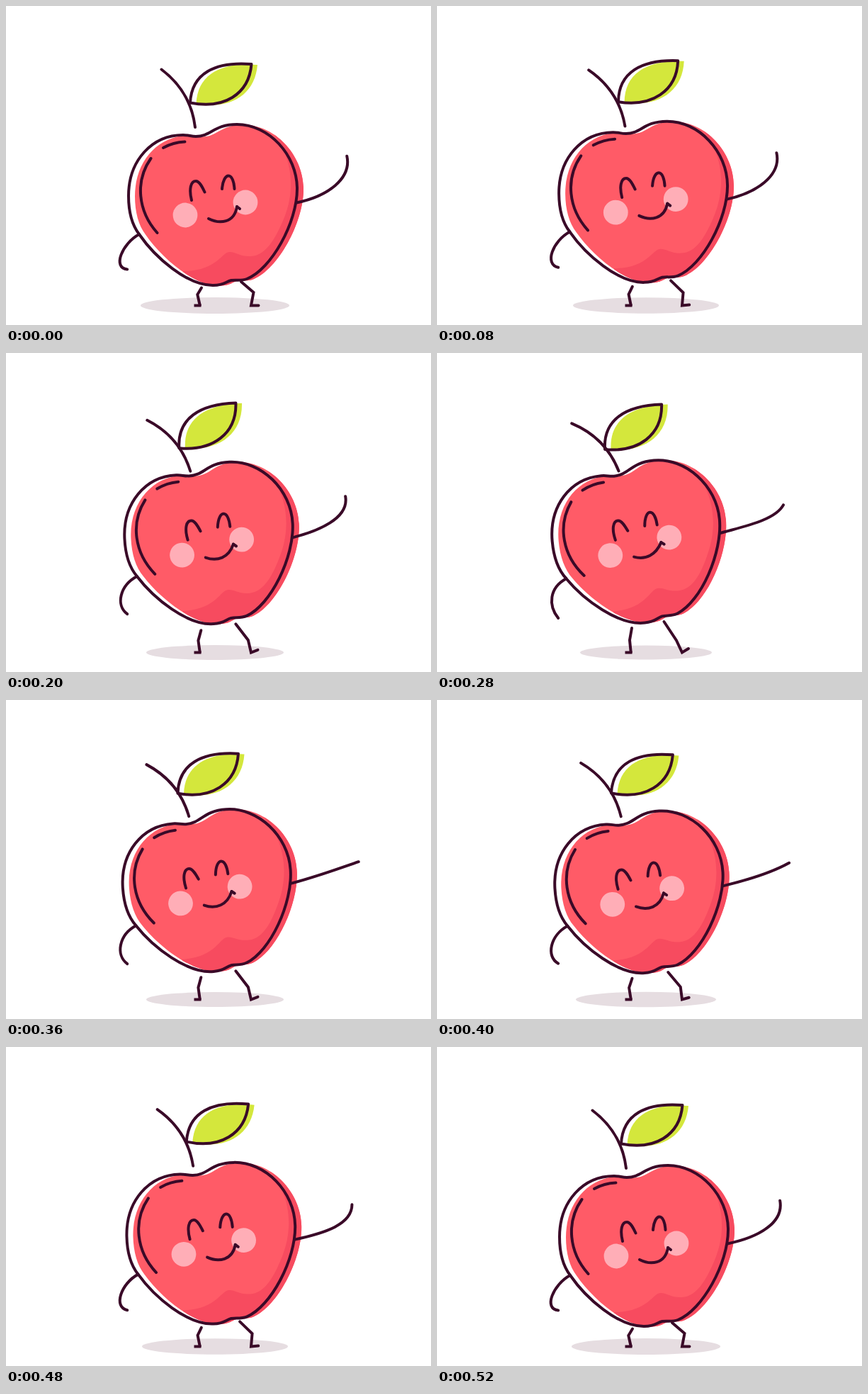
Write an HTML page that moves like this. It is 600 px wide and 450 px high and loops after 560 ms.

```html
<!DOCTYPE html>
<html lang="en">
<head>
<meta charset="utf-8">
<title>Dancing apple</title>
<style>
html, body { margin: 0; width: 100%; height: 100%; overflow: hidden; background: #fff; }
svg { display: block; width: 100vw; height: 100vh; }
.ink { fill: none; stroke: #3a0a28; stroke-width: 4; stroke-linecap: round; stroke-linejoin: round; }
.leg { stroke-linejoin: miter; }
</style>
</head>
<body>
<svg viewBox="0 0 600 450">
  <defs>
    <path id="skin" d="M268 184C290 184 293 167 326 167C371 167 411 210 411 258C411 305 375 371 340 385C332 388 325 386 318 387C310 389 308 394 293 394C256 395 210 354 188 322C178 309 173 290 173 268C173 218 206 182 250 182C258 182 261 184 268 184Z"/>
    <path id="blade" d="M260 136.5C262 95 295 78 346.5 82C343 125 307 146 260 136.5Z"/>
    <clipPath id="inside"><use href="#skin" x="9" y=".5"/></clipPath>
  </defs>
  <ellipse id="shadow" cx="295" cy="422.5" fill="#e6dde1"/>
  <path id="legL" class="ink leg"/>
  <path class="ink leg" style="stroke-linecap:butt" d="M275.5 422.5H265.5"/>
  <path id="legR" class="ink leg"/>
  <g id="leaf">
    <use href="#blade" x="8.5" y="1" fill="#d4e73c"/>
    <use href="#blade" class="ink"/>
  </g>
  <path id="stem" class="ink" d="M219.5 89.5C240 105 262 130 267 171"/>
  <g id="body">
    <use href="#skin" x="9" y=".5" fill="#ff5b67"/>
    <path clip-path="url(#inside)" fill="#f74b5f" d="M368 170C400 200 412 250 393 298C380 330 366 352 346 353C331 354 325 347 316 347C304 347 298 374 250 374V420H440V170Z"/>
    <g fill="#ffaeb7">
      <circle cx="253" cy="295" r="17.4"/>
      <circle cx="338" cy="277" r="17.4"/>
    </g>
    <g class="ink">
      <use href="#skin"/>
      <path d="M204.5 215C182 247 186 289 213.5 320"/>
      <path d="M222 200C231 195 241 192 252.5 191.5"/>
      <path d="M262 274C258 258 261 247 268 247C273 247 277 255 280.5 262.5"/>
      <path d="M305 258C306 246 310 239.5 314 239.5C319 239.5 322 248 322.5 258"/>
      <path id="smile"/>
      <path d="M326 283L330 286"/>
    </g>
  </g>
  <path id="armL" class="ink"/>
  <path id="armR" class="ink"/>
</svg>
<script>
const STEP = 40, LOOP = 560, HALF = 6, STEPS = 13;
const $ = id => document.getElementById(id);
const setPath = (id, d) => $(id).setAttribute("d", d);

function place(id, x, y, dx, dy, angle) {
  $(id).setAttribute("transform", `translate(${dx} ${dy}) rotate(${angle} ${x} ${y})`);
}

// Cubic from a to b; each handle is an offset from its own end.
function limb(id, [ax, ay], [hx, hy], [bx, by], [kx, ky]) {
  setPath(id, `M${ax} ${ay}C${ax + hx} ${ay + hy} ${bx + kx} ${by + ky} ${bx} ${by}`);
}

function draw(time) {
  const step = Math.max(0, Math.floor(time % LOOP / STEP) - 1);
  const w = 1 - Math.abs(step - HALF) / HALF;

  // Travel to a peak and back, bowed differently on the way out and home.
  const sway = (peak, out, home) =>
    peak * w + (step < HALF ? out : home) * 4 * w * (1 - w);

  const px = 295.5, py = 286;
  const dx = sway(-9.2, 1.4, -1.2);
  const dy = sway(-13.2, -3.5, -2.4);
  const lean = sway(-5.1, .85, -.55);
  place("body", px, py, dx, dy, lean);
  place("stem", 267, 171, sway(-10.5, .3, -2), sway(-4.5, -1.4, -4.4), sway(-14.4, -.5, .55));
  place("leaf", 260, 136.5, sway(-23, -.3, -2.5), sway(-.5, -2.2, -5), sway(-6.2, -2.4, 3.5));
  setPath("smile", `M286 300C302 ${308 - 2 * w} ${322.5 - 5.5 * w} ${306 - 6 * w} 326 283`);

  // Shoulders ride on the body.
  const a = lean * Math.PI / 180, cos = Math.cos(a), sin = Math.sin(a);
  const onBody = (x, y) => [
    px + dx + (x - px) * cos - (y - py) * sin,
    py + dy + (x - px) * sin + (y - py) * cos
  ];
  limb("armL", onBody(188, 322), [-24, 13],
    [171.2, 371.5 + sway(2.5, -5.6, -1.1)], [-21.5 + 7 * w, -2 - 16 * w]);

  // The waving hand circles, with a flick where the arm is straightest.
  const turn = 2 * Math.PI * step / STEPS;
  const flick = 1.8 * Math.cos(2 * turn - 1.45);
  const stretch = ((1 + Math.cos(turn - 3.87)) / 2) ** 3;
  const hand = [
    486.4 - 9.9 * Math.cos(turn - 1) + flick,
    214.9 - 13.9 * Math.cos(turn - 1.32) + flick
  ];
  limb("armR", onBody(410, 277.5), [44 - 13 * w, -9],
    hand, [7 - 39 * stretch, 32 - 21 * stretch]);

  setPath("legL", `M${276 - w} ${397.5 - 9.5 * w}L${270.3 + 1.7 * w} ${407 - 2 * w}L273.7 422`);
  setPath("legR", `M${332 - 11.5 * w} ${389 - 10 * w}L${349.5 - 11.5 * w} ${404 + 1.5 * w}`
    + `L346 422.5L${356.5 - 1.5 * w} ${422.5 - 5.5 * w}`);
  $("shadow").setAttribute("rx", 105 - 12 * w);
  $("shadow").setAttribute("ry", 11.5 - 1.5 * w);
}

let start;
function tick(now) {
  start ??= now;
  draw(now - start);
  requestAnimationFrame(tick);
}
draw(0);
requestAnimationFrame(tick);
</script>
</body>
</html>
```
